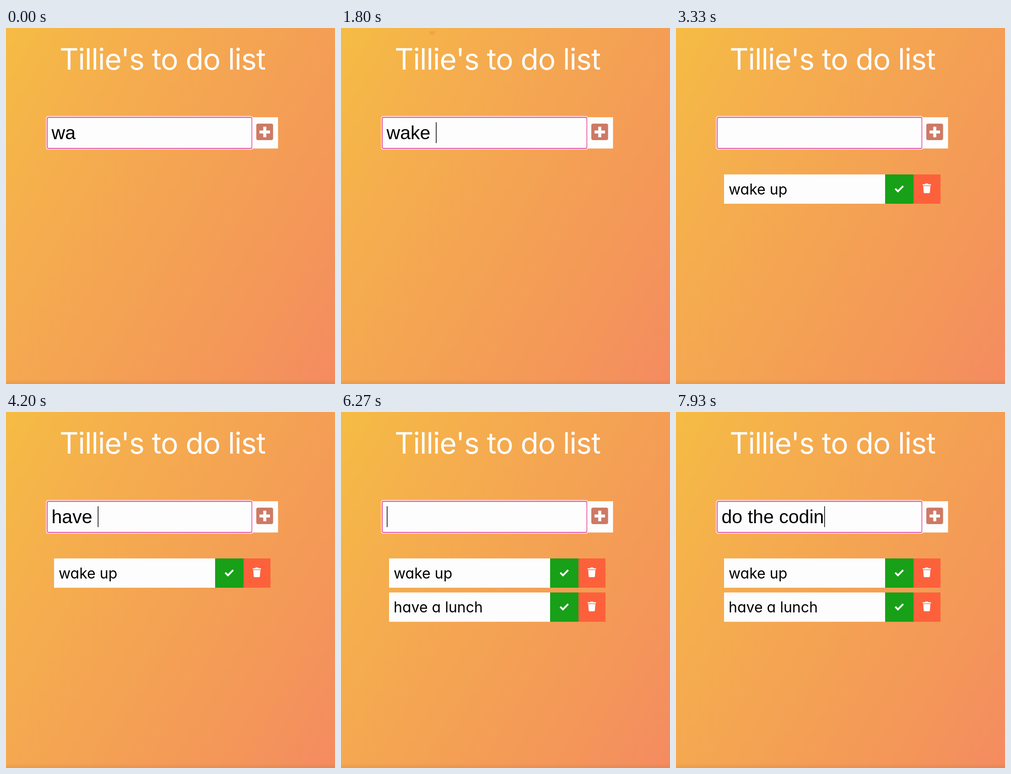
An HTML page that plays this animation: 719 px wide and 778 px high, repeating every 8 s.

```html
<!DOCTYPE html>
<html lang="en">
<head>
<meta charset="utf-8">
<title>To do list</title>
<style>
  html, body { margin: 0; width: 100%; height: 100%; overflow: hidden; }
  body { background: linear-gradient(120deg, #f5bc44 0%, #f5ad4e 27%, #f4a253 52%, #f49759 77%, #f48b60 100%); }
  svg { display: block; width: 100%; height: 100%; }
  text { white-space: pre; }
  .ui { font-family: Inter, "Open Sans", sans-serif; font-optical-sizing: none; font-feature-settings: "cv11"; }
  .title { font-size: 64px; letter-spacing: -1px; fill: #fdfdfd; text-anchor: middle; }
  .label { font-size: 32px; }
  .field { font: 41.1px "Liberation Sans", Arial, sans-serif; }
  .paper { fill: #fdfdfd; }
</style>
</head>
<body>
<svg viewBox="0 0 719 778" preserveAspectRatio="none">
  <defs>
    <linearGradient id="shade" x2="0" y2="1">
      <stop stop-color="#8a5a2a" stop-opacity="0"/>
      <stop offset="1" stop-color="#8a5a2a" stop-opacity=".14"/>
    </linearGradient>
    <g id="buttons">
      <rect x="457" y="320" width="62" height="64" fill="#18a018"/>
      <path d="M479.2 351.2L485 357L496.5 345.3" fill="none" stroke="#fdfdfd" stroke-width="4"/>
      <rect x="519" y="320" width="59" height="64" fill="#fd613b"/>
      <path class="paper" d="M539 341.4h5.4l1-1.6h5.4l1 1.6h5.4v2.5H539zM540.3 345.2h15.6l-1 14a2 2 0 0 1-2 1.8h-9.6a2 2 0 0 1-2-1.8z"/>
    </g>
  </defs>
  <rect y="768" width="719" height="10" fill="url(#shade)"/>
  <text class="ui title" x="342" y="91">Tillie's to do list</text>

  <rect class="paper" x="87.5" y="192.5" width="452.5" height="73.5" rx="5"/>
  <rect class="paper" x="90" y="195.3" width="447.6" height="68" rx="3" stroke="#ec63a6" stroke-width="2.4"/>
  <rect class="paper" x="538.3" y="195" width="56.2" height="68.3"/>
  <rect x="547" y="209" width="36.7" height="36" rx="4" fill="#cd7a65"/>
  <path d="M554 227.3h23M565.5 215.8v23" stroke="#fdfdfd" stroke-width="6.6"/>

  <g id="items"></g>
  <text id="field" class="field" x="99.5" y="243"></text>
  <rect id="caret" y="206" width="1.5" height="45.5"/>
  <g id="pointer" fill="none" stroke-linecap="round">
    <path id="beam" d="M190 206.5q4 0 4 3v13q0 3-4 3M198 206.5q-4 0-4 3v13q0 3 4 3M192 216.5h4" stroke="#fff" stroke-width="3.4"/>
    <use href="#beam" style="display:none"/>
    <path d="M190 206.5q4 0 4 3v13q0 3-4 3M198 206.5q-4 0-4 3v13q0 3 4 3M192 216.5h4" stroke="#111" stroke-width="1.5"/>
  </g>
  <path id="heart" fill="#e2330c" d="M0 5.2C-2.5 3-6.4 1-6.4-2C-6.4-5.2-1.6-5.8 0-2.6C1.6-5.8 6.4-5.2 6.4-2C6.4 1 2.5 3 0 5.2z"/>
</svg>
<script>
const LOOP = 8000, CLICK = 730, HEART_END = 1940;
const $ = id => document.getElementById(id);

// Each entry: what gets typed and when every key lands; "enter" adds it to the list.
const entries = [
  { text: "wake up", keys: [-700, -500, 1070, 1200, 1400, 1930, 2130], enter: 2730 },
  { text: "have a lunch", keys: [3600, 3800, 3930, 4070, 4200, 4400, 4530, 4800, 5000, 5200, 5330, 5530], enter: 5930 },
  { text: "do the coding", keys: [6530, 6670, 6800, 6930, 7070, 7200, 7330, 7400, 7530, 7670, 7800, 7870], enter: Infinity }
];
const resets = [CLICK, ...entries.flatMap(e => [...e.keys, e.enter])];

const rows = entries.slice(0, 2).map((e, i) => {
  const row = document.createElementNS("http://www.w3.org/2000/svg", "g");
  row.setAttribute("transform", `translate(0 ${i * 74.4})`);
  row.innerHTML = `<rect class="paper" x="105" y="320" width="352.5" height="64"/>
    <text class="ui label" x="115" y="363.5">${e.text}</text><use href="#buttons"/>`;
  $("items").append(row);
  return row;
});

function show(el, on) {
  el.style.visibility = on ? "visible" : "hidden";
}

function draw(t) {
  const entry = entries.find(e => t < e.enter);
  const field = $("field");
  field.textContent = entry.text.slice(0, entry.keys.filter(k => k <= t).length);
  rows.forEach((row, i) => show(row, t >= entries[i].enter));

  const last = Math.max(...resets.filter(k => k <= t));
  const width = field.textContent ? field.getComputedTextLength() : 0;
  $("caret").setAttribute("x", 100 + width);
  show($("caret"), (t - last) % 1000 < 500);

  show($("pointer"), t >= 470 && t < entries[0].keys[2]);

  const alive = t >= CLICK && t < HEART_END;
  show($("heart"), alive);
  if (alive) {
    $("heart").setAttribute("transform", `translate(199 ${187.5 - 0.176 * (t - 800)})`);
    $("heart").setAttribute("opacity", Math.min(1, (HEART_END - t) / 1150));
  }
}

const start = performance.now();
function tick(now) {
  draw(Math.max(0, now - start) % LOOP);
  requestAnimationFrame(tick);
}
draw(0);
requestAnimationFrame(tick);
</script>
</body>
</html>
```
